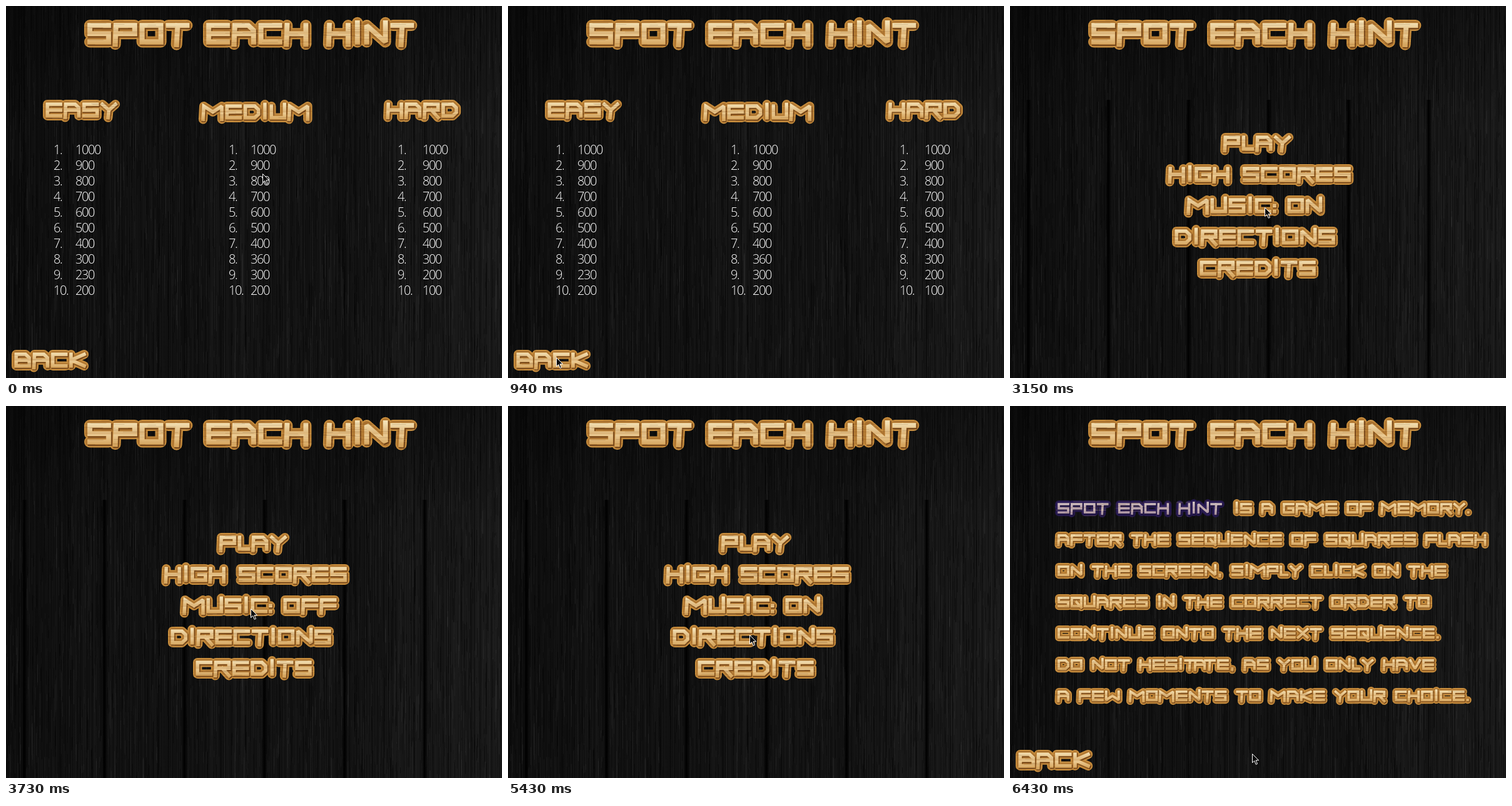
These frames come from a looping animation (793x595 px, 8000 ms). An HTML page with a canvas:

```html
<!DOCTYPE html>
<html lang="en">
<head>
<meta charset="utf-8">
<title>Memory game menu</title>
<style>
html, body { margin: 0; width: 100%; height: 100%; overflow: hidden; background: #121212; }
#stage { position: relative; width: 793px; height: 595px; overflow: hidden; }
canvas, section { position: absolute; left: 0; top: 0; }

.seams {
  position: absolute; left: 0; top: 150px; width: 793px; height: 445px;
  background: repeating-linear-gradient(90deg, #0000 0 26px, #000c 28px 30px, #0000 34px 128px);
}
.faint { opacity: .35; }

.score {
  position: absolute; white-space: pre; color: #fff;
  font: 300 20px/25px "Open Sans", "Noto Sans", sans-serif; letter-spacing: -1.45px;
}

#scores, #menu, #rules, #on, #off { animation: 8s step-end infinite; }
#scores { animation-name: scores; }
#menu { animation-name: menu; }
#rules { animation-name: rules; }
#on { animation-name: on; }
#off { animation-name: off; }
@keyframes scores { 0% { opacity: 1 } 30.875%, 100% { opacity: 0 } }
@keyframes menu { 0% { opacity: 0 } 30.875% { opacity: 1 } 71.375%, 100% { opacity: 0 } }
@keyframes rules { 0% { opacity: 0 } 71.375%, 100% { opacity: 1 } }
@keyframes on { 0% { opacity: 1 } 46.625% { opacity: 0 } 55.625%, 100% { opacity: 1 } }
@keyframes off { 0% { opacity: 0 } 46.625% { opacity: 1 } 55.625%, 100% { opacity: 0 } }

#cursor { position: absolute; left: 0; top: 0; animation: cursor 8s step-end infinite; }
@keyframes cursor {
  0% { transform: translate(410px, 268px) }
  3.5% { transform: translate(355px, 326px) }
  5.375% { transform: translate(262px, 408px) }
  6.917% { transform: translate(183px, 479px) }
  8.458% { transform: translate(122px, 533px) }
  10% { transform: translate(91px, 560px) }
  11.75% { transform: translate(77px, 562px) }
  34.375% { transform: translate(245px, 402px) }
  36.25% { transform: translate(330px, 320px) }
  37.813% { transform: translate(390px, 256px) }
  39.375% { transform: translate(407px, 322px) }
  43.125% { transform: translate(391px, 324px) }
  58.75% { transform: translate(391px, 337px) }
  60.625% { transform: translate(395px, 387px) }
  62.625% { transform: translate(394px, 384px) }
  64.125% { transform: translate(389px, 381px) }
  67.875% { transform: translate(386px, 366px) }
  73.375% { transform: translate(377px, 366px) }
  75.125% { transform: translate(292px, 325px) }
  77.125% { transform: translate(225px, 375px) }
  78.625% { transform: translate(183px, 439px) }
  80.375%, 100% { transform: translate(387px, 556px) }
}
</style>
</head>
<body>
<div id="stage">
  <canvas id="wood" width="793" height="595"></canvas>
  <div class="seams faint"></div>
  <section id="scores"></section>
  <section id="menu"><div class="seams"></div></section>
  <section id="rules"></section>
  <svg id="cursor" width="12" height="19" viewBox="0 0 12 19">
    <path d="M.5 .5V14.5L3.8 11.5L6.2 17.3L8.5 16.3L6.1 10.7H10.6Z" fill="#0a0a0a" stroke="#fff"/>
  </svg>
</div>
<script>
const W = 793, H = 595;
const $ = id => document.getElementById(id);

function seeded(seed) {
  return () => (seed = (seed * 16807) % 2147483647) / 2147483647;
}

// Dark planks: soft shading across the stage plus vertical grain.
function drawWood() {
  const c = $('wood').getContext('2d'), rnd = seeded(71);
  const base = c.createLinearGradient(0, 0, W, 0);
  [[0, 13], [.05, 15], [.2, 18], [.36, 17], [.5, 21], [.66, 18], [.8, 22], [1, 25]]
    .forEach(([at, v]) => base.addColorStop(at, `rgb(${v},${v},${v})`));
  c.fillStyle = base;
  c.fillRect(0, 0, W, H);
  for (let x = 0; x < W; x++) {
    c.fillStyle = rnd() < .55 ? `rgba(0,0,0,${rnd() * .3})` : `rgba(255,255,255,${rnd() * .025})`;
    c.fillRect(x, 0, 1, H);
  }
  for (let i = 0; i < 5000; i++) {
    c.fillStyle = rnd() < .5 ? `rgba(0,0,0,${rnd() * .45})` : `rgba(255,255,255,${rnd() * .05})`;
    c.fillRect(Math.floor(rnd() * W), rnd() * (H + 80) - 80, 1, 8 + rnd() * 70);
  }
  const shade = c.createLinearGradient(0, 0, 0, H);
  shade.addColorStop(0, 'rgba(0,0,0,.3)');
  shade.addColorStop(.35, 'rgba(0,0,0,0)');
  c.fillStyle = shade;
  c.fillRect(0, 0, W, H);
}

// Each letter is a few strokes through named points of a small lattice.
const POINTS = {
  m: [0, -.16], n: [.5, -.16], o: [1, -.16],
  a: [0, 0], b: [.5, 0], c: [1, 0],
  d: [0, .5], e: [.5, .5], f: [1, .5],
  g: [0, 1], h: [.5, 1], i: [1, 1],
  j: [-.04, 1.14], k: [.44, 1.16], l: [1, 1.14],
  p: [.72, 0], q: [1, .3], r: [1, .7], s: [.72, 1]
};
const GLYPHS = {
  A: 'japqi df', B: 'gapqig df', C: 'cagi', D: 'apqrsga', E: 'cagi df', F: 'caj df',
  G: 'cagife', H: 'aj cl df', I: 'nh', K: 'ag cdi', L: 'agi', M: 'jaecl', N: 'gaio',
  O: 'acigac', P: 'jacfd', Q: 'acigac el', R: 'jacfd el', S: 'cadfig', T: 'ac bk',
  U: 'agio', V: 'ahc', W: 'ageic', X: 'ai cg', Y: 'aec ek', '.': 'h', ',': 'hk', ':': 'e h'
};
const WIDTHS = { M: 24.6, W: 24, I: 7, L: 14, '.': 6, ',': 7, ':': 3 };
const GAP = 1.9, SPACE = 13.1, STROKE = 4, CAP = 17.2;

function lettering(text, x, y, size) {
  const path = new Path2D(), k = size / 20;
  const pad = 3 + size * .05, half = STROKE / 2;
  let pen = 0, last = '';
  for (const ch of text) {
    if (ch === ' ') { pen += SPACE; last = ch; continue; }
    if (last + ch === 'AT' || last + ch === 'TA') pen -= 5;
    const w = WIDTHS[ch] || 19;
    for (const stroke of GLYPHS[ch].split(' ')) {
      [...stroke].forEach((name, n) => {
        const [u, v] = POINTS[name];
        const px = x + pad + k * (pen + half + u * (w - STROKE));
        const py = y + pad + k * (half + v * (CAP - STROKE));
        if (n) path.lineTo(px, py); else path.moveTo(px, py);
        if (stroke.length === 1) path.lineTo(px + .05, py);
      });
    }
    pen += w + GAP;
    last = ch;
  }
  return path;
}

const GOLD = { rim: '#c88d3c', band: '#ad7430', dark: '#70431a', face: ['#f3e0b4', '#dcb478', '#ebcb94', '#d6a660'] };
const VIOLET = { rim: '#221747', band: '#30205f', dark: '#170e35', face: ['#d3c3c3', '#b49da6', '#c5b0b2', '#a992a2'] };

function drawWords(c, text, x, y, size, tone = GOLD) {
  const path = lettering(text, x, y, size);
  const line = STROKE * size / 20, pad = 3 + size * .05;
  const top = y + pad, bottom = top + CAP * size / 20;
  const layer = (width, color, join, dx = 0, dy = 0) => {
    c.save();
    c.translate(dx, dy);
    c.lineWidth = width;
    c.strokeStyle = color;
    c.lineJoin = join;
    c.lineCap = join === 'round' ? 'round' : 'square';
    c.miterLimit = 2;
    c.stroke(path);
    c.restore();
  };
  const face = c.createLinearGradient(0, top, 0, bottom);
  tone.face.forEach((color, n) => face.addColorStop([0, .5, .56, 1][n], color));
  layer(line + pad * 2, tone.rim, 'round');
  layer(line + pad * 2 - 4, tone.band, 'round');
  layer(line + 1, tone.dark, 'miter', size / 28, size / 22);
  layer(line + .6, tone.rim, 'miter');
  layer(line - .4, face, 'miter');
}

// Fine horizontal grain, only on top of the letters.
function addGrain(c) {
  const rnd = seeded(19);
  c.globalCompositeOperation = 'source-atop';
  for (let i = 0; i < 2600; i++) {
    c.fillStyle = rnd() < .6 ? 'rgba(95,50,10,.16)' : 'rgba(255,225,160,.14)';
    c.fillRect(rnd() * W, Math.floor(rnd() * H), 10 + rnd() * 40, 1);
  }
}

function board(parent, words, id) {
  const canvas = document.createElement('canvas');
  canvas.width = W;
  canvas.height = H;
  if (id) canvas.id = id;
  canvas.setAttribute('role', 'img');
  canvas.setAttribute('aria-label', words.map(w => w[0]).join(' '));
  const c = canvas.getContext('2d');
  words.forEach(w => drawWords(c, ...w));
  addGrain(c);
  $(parent).append(canvas);
}

function scoreColumn(rankX, scoreX, scores) {
  scores.forEach((score, n) => {
    [[rankX, `${n + 1}.`], [scoreX, score]].forEach(([x, text]) => {
      const el = document.createElement('div');
      el.className = 'score';
      el.textContent = text;
      el.style.left = x + 'px';
      el.style.top = 217 + n * 25 + 'px';
      $('scores').append(el);
    });
  });
}

const title = [['SPOT', 125, 22, 40], ['EACH', 315, 22, 40], ['HINT', 508, 22, 40]];
const back = ['BACK', 9, 550, 28];

drawWood();

board('scores', [...title, ['EASY', 59, 150, 28], ['MEDIUM', 309, 153, 28], ['HARD', 604, 150, 28], back]);
const topScores = [1000, 900, 800, 700, 600, 500, 400];
scoreColumn(76, 111, [...topScores, 300, 230, 200]);
scoreColumn(356, 391, [...topScores, 360, 300, 200]);
scoreColumn(626, 666, [...topScores, 300, 200, 100]);

board('menu', [
  ...title,
  ['PLAY', 337, 203, 28], ['HIGH SCORES', 249, 253, 28], ['MUSIC:', 279, 303, 28],
  ['DIRECTIONS', 259, 353, 28], ['CREDITS', 299, 403, 28]
]);
board('menu', [['ON', 439, 303, 28]], 'on');
board('menu', [['OFF', 439, 303, 28]], 'off');

const rules = [
  'AFTER THE SEQUENCE OF SQUARES FLASH',
  'ON THE SCREEN, SIMPLY CLICK ON THE',
  'SQUARES IN THE CORRECT ORDER TO',
  'CONTINUE ONTO THE NEXT SEQUENCE.',
  'DO NOT HESITATE, AS YOU ONLY HAVE',
  'A FEW MOMENTS TO MAKE YOUR CHOICE.'
];
board('rules', [
  ...title,
  ['SPOT EACH HINT', 72, 151, 20, VIOLET],
  ['IS A GAME OF MEMORY.', 355, 151, 20],
  ...rules.map((text, n) => [text, 72, 201 + n * 50, 20]),
  back
]);
</script>
</body>
</html>
```
